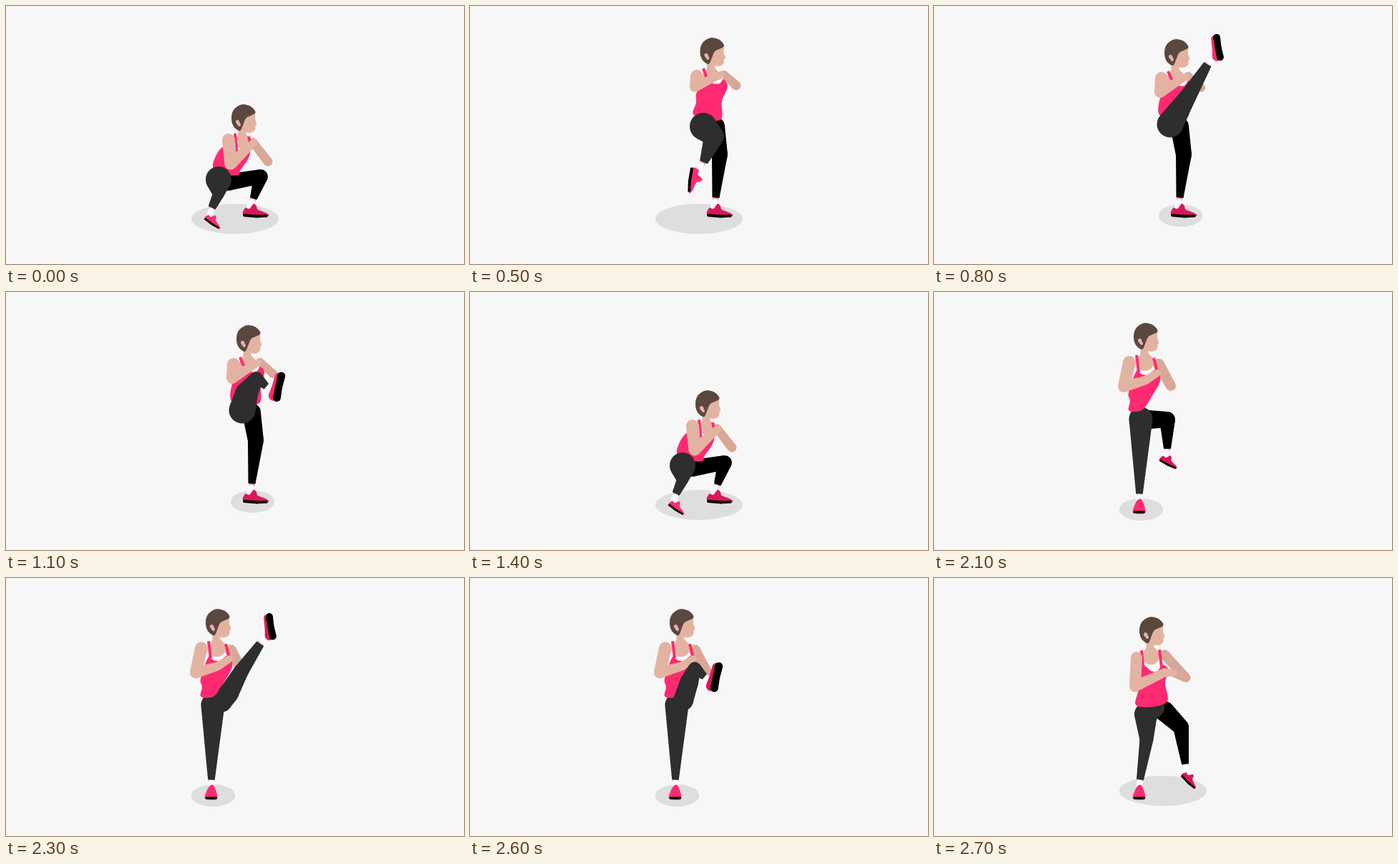
Recreate the animation shown at these times as an HTML page. Size 640 px wide and 360 px high, loop 2.8 s.

```html
<!DOCTYPE html>
<html lang="en">
<head>
<meta charset="utf-8">
<title>Squat and kick</title>
<style>
html, body { margin: 0; width: 100%; height: 100%; overflow: hidden; background: #f7f7f7; }
svg { display: block; width: 100%; height: 100%; }
</style>
</head>
<body>
<svg id="stage" viewBox="0 0 640 360"></svg>
<script>
const PINK = '#ff2a70', RED = '#d9185c', SKIN = '#e3b3a2', SHADE = '#d8a797',
      HAIR = '#5a483f', GREY = '#2e2e2e', BLACK = '#000', WHITE = '#fff';

const parse = s => s.split(' ').map(p => p.split(',').map(Number));
const place = ([x, y, turn = 0, size = 1], art) =>
  `<g transform="translate(${x} ${y}) rotate(${turn}) scale(${size})">${art}</g>`;
const ellipse = (fill, x, y, rx, ry) =>
  `<ellipse cx="${x}" cy="${y}" rx="${rx}" ry="${ry}" fill="${fill}"/>`;
const strap = pts =>
  `<polyline points="${pts}" fill="none" stroke="${PINK}" stroke-width="4"/>`;

// Closed smooth curve through the points.
function blob(fill, pts) {
  const p = parse(pts), n = p.length, at = i => p[(i + n) % n];
  const bend = (a, b, c) => b.map((v, k) => v + (c[k] - a[k]) / 6);
  const d = p.map((b, i) =>
    `C${bend(at(i - 1), b, at(i + 1))} ${bend(at(i + 2), at(i + 1), b)} ${at(i + 1)}`);
  return `<path fill="${fill}" d="M${p[0]}${d.join('')}Z"/>`;
}

// Tapered tube through joints "x,y,radius"; a cut tube has a flat far end.
function limb(fill, joints, cut = false) {
  const p = parse(joints);
  let art = '';
  p.forEach(([x, y, r], i) => {
    if (!cut || i < p.length - 1) art += ellipse(fill, x, y, r, r);
    if (!i) return;
    const [u, v, q] = p[i - 1];
    const dir = Math.atan2(y - v, x - u);
    const lean = Math.acos((q - r) / Math.hypot(x - u, y - v));
    const rim = (cx, cy, cr, a) => [cx + cr * Math.cos(a), cy + cr * Math.sin(a)];
    art += `<polygon fill="${fill}" points="${[
      rim(u, v, q, dir + lean), rim(x, y, r, dir + lean),
      rim(x, y, r, dir - lean), rim(u, v, q, dir - lean)].join(' ')}"/>`;
  });
  return art;
}

// Shoes: seen from the side (origin at the heel), the front and the sole.
const sideShoe = (fill, ...spot) => place(spot,
  blob(fill, '1,-2 2,-12 8,-11 14,-18 18,-15 20,-10 32,-5 33,-1') +
  limb(BLACK, '1,-2,2 18,-0.5,2 32,-1,1.8'));
const frontShoe = place([287, 309],
  blob(PINK, '-8.5,-1 -6,-13 -1,-20 4,-18 8,-1') + limb(BLACK, '-7,-2,1.6 6.5,-2,1.6'));
const soleShoe = (fill, ...spot) => place(spot,
  limb(fill, '-4,-15,5 -6,0,4.5 -6,13,7') + limb(BLACK, '0,-16,5.5 -1,0,5 -1,15,5.5'));

function leg(fill, joints, foot, shoe) {
  const [x, y] = parse(joints).pop();
  const sock = foot.map((v, k) => (v + [x, y][k]) / 2);
  return limb(SKIN, `${x},${y},4 ${foot},4`) + limb(WHITE, `${sock},4 ${foot},4.5`, true) +
    ellipse(WHITE, ...foot, 4.5, 4) + limb(fill, joints, true) + shoe;
}

const neck = limb(SKIN, '330,168,5.5 330,182,5.5 331,192,12');
const head =
  blob(SKIN, '330,148 343,146 348,151 348,158 350.5,165 348.5,167 348,173 341,177 330,172') +
  blob(HAIR, '315,157 318,145 329,137.5 341,139.5 348.5,149 336,156 332,164 327,174 318,168') +
  limb(SKIN, '323.5,161.5,2.5 326,166,2');

function figure(pose) {
  return pose.ground + pose.back.join('') + place(pose.head, neck) +
    limb(SHADE, pose.farArm) +
    blob(PINK, pose.torso) +
    place(pose.collar, blob(WHITE, '-9,0 0,2 9,-1 5,6 -3,6')) +
    pose.straps.map(strap).join('') +
    limb(SKIN, pose.nearArm) + place(pose.head, head) + pose.front.join('');
}

const wide = ellipse('#dedede', 320, 297, 61, 21);
const spot = (x, y) => ellipse('#dedede', x, y, 30.7, 15.5);

const flatShoe = sideShoe(RED, 332, 294);
const rightLeg = leg(BLACK, '343,168,13 349,207,11 343.5,267,5', [341, 279], flatShoe);
const leftLeg = leg(GREY, '289,177,16.5 287,281,4.8', [287, 290], frontShoe);

const squat = {
  ground: wide, head: [0, 0], collar: [331, 197], straps: ['320,178 322,201', '339,182 341,190'],
  torso: '301,198 321,197 331,204 341,203 338,214 327,230 325,236 305,235 289,224',
  nearArm: '311,187,9 314,220,8.5 346,191,5', farArm: '345,190,6 366,217,6.5',
  back: [leg(BLACK, '311,246,11.5 356,238,10 346,268,5', [341, 279], flatShoe)],
  front: [leg(GREY, '297,242,18 297,262,8 288,281,5.5', [285, 290], sideShoe(PINK, 277, 298, 32, 0.72))]
};

const stand = {
  ground: wide, head: [6.5, -93], collar: [344, 102], straps: ['326,87 332,104'],
  torso: '317,120 332,103 341,109 352,101 360,112 352,133 351,158 330,158 312,151 316,135',
  nearArm: '317,98,9 314,113,7 352,95,4.5', farArm: '355,95,5 372,111,6.5',
  back: [rightLeg],
  front: [leg(GREY, '326,168,19 341,182,14 327,217,6', [319, 228], sideShoe(PINK, 308, 226, 95))]
};

const knee = {
  ...stand, ground: spot(344.7, 292.5), head: [7, -91], collar: [345, 105], straps: ['327,91 334,107'],
  torso: '319,120 333,106 343,111 354,104 361,112 356,130 355,154 334,158 314,150',
  nearArm: '318,101,9 316,120,8 353,98,4.5', farArm: '355,97,5 373,114,6',
  front: [leg(GREY, '330,165,18.5 336,142,16 350,120,9 363,131,5', [369, 135], soleShoe(PINK, 382, 133, 10))]
};

const kick = {
  ...knee,
  front: [leg(GREY, '330,165,18.5 342,146,15 360,118,10.5 382,82,6', [389, 75], soleShoe(PINK, 398, 58, -12, 0.9))]
};

const open = {
  ground: wide, head: [-28, -83], collar: [307, 124], straps: ['290,101 292,123', '315,100 318,124'],
  torso: '285,136 290,120 306,130 319,121 328,129 323,146 326,172 303,180 282,177 285,158',
  nearArm: '283,111,8 281,151,8 322,132,6 336,132,4.5', farArm: '322,107,7 352,139,6.5 332,132,5',
  back: [
    leg(BLACK, '322,186,14 345,208,11 351,259,5', [352, 269], sideShoe(RED, 345, 277, 42, 0.75)),
    leg(GREY, '309,181,13 296,190,16 297,225,9.5 288,281,5', [287, 290], frontShoe)],
  front: []
};

const high = {
  ground: spot(289.5, 303.5), head: [-36, -94], collar: [294, 109], straps: ['283,88 286,112', '307,92 312,111'],
  torso: '272,140 284,109 297,116 311,108 316,124 303,148 293,163 283,167 272,165 274,152',
  nearArm: '273,98,9 265,132,8 296,123,6 312,113,5', farArm: '314,101,8 331,131,7',
  back: [leftLeg],
  front: [leg(GREY, '302,174,13 311,161,14 328,131,10.5 355,92,6', [362, 85], soleShoe(RED, 371, 68, -12, 0.9))]
};

const raise = {
  ...high,
  front: [leg(GREY, '298,171,14 306,146,13 314,126,9 327,137,5', [333, 141], soleShoe(RED, 345, 139, 10))]
};

const lift = {
  ...high,
  back: [leg(BLACK, '300,178,13 326,178,11 326,218,5', [323, 229], sideShoe(RED, 315, 236, 25, 0.75)), leftLeg],
  front: []
};

// Each pose and how long it holds, in ms.
const steps = [[squat, 500], [stand, 200], [knee, 100], [kick, 300], [knee, 100], [stand, 200],
  [squat, 500], [open, 200], [lift, 100], [raise, 100], [high, 300], [raise, 100], [open, 100]];
const LOOP = steps.reduce((sum, [, hold]) => sum + hold, 0);

const stage = document.getElementById('stage');
let shown;
function update(t) {
  let left = t % LOOP;
  const [pose] = steps.find(([, hold]) => (left -= hold) < 0);
  if (pose === shown) return;
  stage.innerHTML = figure(pose);
  shown = pose;
}

const start = performance.now();
function tick() {
  update(performance.now() - start);
  requestAnimationFrame(tick);
}
tick();
</script>
</body>
</html>
```
